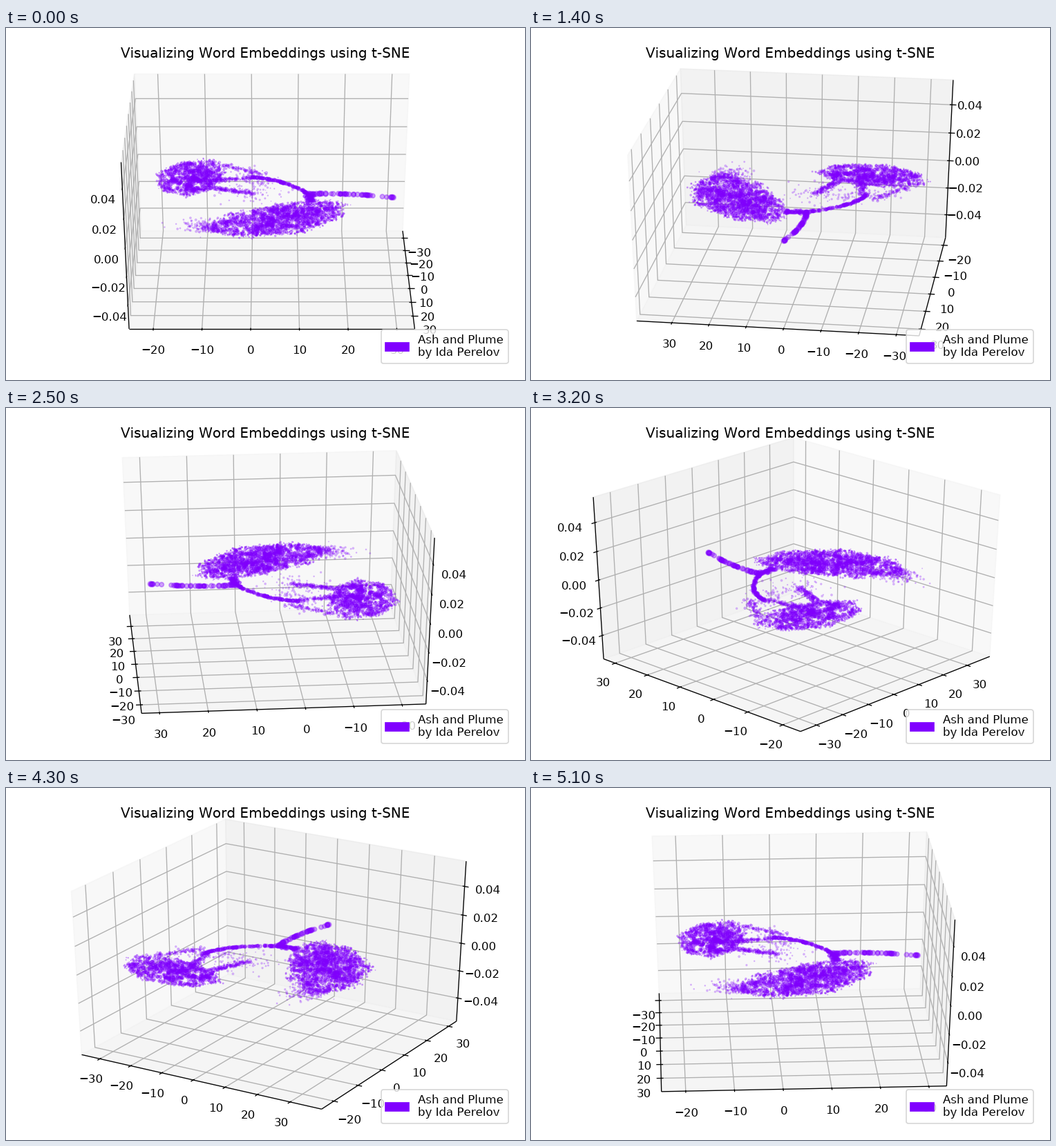
Animation of 751 by 510 pixels, one loop 5.2 s. Source, as a matplotlib script:

```python
import numpy as np
import matplotlib.pyplot as plt
from matplotlib.animation import FuncAnimation
from matplotlib.collections import LineCollection
from matplotlib.patches import Patch, Polygon

W, H, DPI = 751, 510, 120
FRAMES, INTERVAL, STEP = 52, 100, 7        # degrees of turn per frame
PURPLE = (0.5, 0.0, 1.0)
ELEV, DIST = np.radians(30), 10
EDGE = 0.5 + 1 / 48                        # half size of the drawn box
DELTA = 1 / 12
LABEL_GAP = 11.5 * 48 / 720 * DELTA

LIMITS = [(-34.5, 38.0), (-23.8, 32.5), (-0.055, 0.055)]
TICKS = [np.arange(-30, 31, 10), np.arange(-20, 31, 10),
         np.arange(-2, 3) * 0.02]
FORMATS = ["{:.0f}", "{:.0f}", "{:.2f}"]
PANE_GREYS = [0.95, 0.90, 0.925]

plt.rcParams.update({"font.family": "DejaVu Sans", "text.hinting": "default",
                     "text.kerning_factor": 6})
rng = np.random.default_rng(11)


# ---- point cloud, in box coordinates centred on zero ----
# each helper returns points, marker sizes and one alpha

def blob(centre, radii, tilt, n, alpha=0.27):
    """Soft, clumpy ellipse whose dots shrink towards a ragged rim."""
    theta = rng.uniform(0, 2 * np.pi, n)
    rho = rng.uniform(0, 1, n) ** 0.55
    half = n // 2
    seeds = rng.integers(n // 15, size=half)
    theta[:half] = theta[seeds] + rng.normal(0, 0.09, half)
    rho[:half] = np.abs(rho[seeds] + rng.normal(0, 0.06, half))
    reach = rho * (1 + 0.06 * np.sin(3 * theta) + 0.04 * np.sin(7 * theta))
    a, b = radii[0] * reach * np.cos(theta), radii[1] * reach * np.sin(theta)
    c, s = np.cos(tilt), np.sin(tilt)
    pts = np.column_stack([a * c - b * s, a * s + b * c]) + centre
    pts += rng.normal(0, 0.006, pts.shape)
    fade = 1 - 0.8 * np.clip(rho, 0, 1) ** 4
    return pts, rng.uniform(0.5, 9, n) * fade, alpha


def haze(centre, spread, n):
    """Faint loose dots."""
    return rng.normal(centre, spread, (n, 2)), rng.uniform(0.2, 3, n), 0.2


def strand(start, bend, end, n, spread, size, alpha):
    """Dots along a quadratic curve."""
    t = np.sort(rng.uniform(0, 1, n))[:, None]
    start, bend, end = map(np.array, (start, bend, end))
    line = (1 - t) ** 2 * start + 2 * t * (1 - t) * bend + t ** 2 * end
    return line + rng.normal(0, spread, line.shape), rng.uniform(*size, n), alpha


def wisp(start, end, n, spread):
    middle = (np.array(start) + end) / 2
    return strand(start, middle, end, n, spread, (0.3, 5), 0.25)


FORK = (-0.054, 0.138)
GROUPS = [
    blob((-0.25, -0.305), (0.21, 0.125), -0.2, 1150),
    blob((0.22, 0.02), (0.285, 0.15), 2.08, 1900),
    haze((0.29, -0.25), (0.035, 0.04), 130),
    haze((-0.13, -0.08), (0.09, 0.07), 130),
    wisp((-0.40, -0.19), (-0.28, -0.04), 80, 0.014),
    wisp((-0.21, -0.25), (-0.24, -0.07), 110, 0.009),
    wisp((-0.13, -0.24), (-0.06, -0.07), 130, 0.010),
    strand(FORK, (-0.02, 0.145), (0.03, 0.142), 60, 0.008, (3, 12), 0.3),
    strand((-0.25, -0.08), (-0.224, 0.05), FORK, 110, 0.003, (4, 10), 0.33),
    strand(FORK, (-0.075, 0.265), (-0.0155, 0.452), 46, 0.0015, (12, 19), 0.35),
]
flat = np.concatenate([pts for pts, _, _ in GROUPS])
sizes = np.concatenate([size for _, size, _ in GROUPS])
colors = [(*PURPLE, alpha) for pts, _, alpha in GROUPS for _ in pts]
widths = 0.6 + sizes / 30
cloud = np.column_stack([flat, np.zeros(len(flat))])


# ---- projection ----

def project(p, azim):
    """Perspective view of points with shape (..., 3)."""
    x, y, z = np.moveaxis(np.asarray(p, float), -1, 0)
    right = y * np.cos(azim) - x * np.sin(azim)
    near = x * np.cos(azim) + y * np.sin(azim)
    depth = DIST - near * np.cos(ELEV) - z * np.sin(ELEV)
    up = z * np.cos(ELEV) - near * np.sin(ELEV)
    return np.stack([right / depth, up / depth], axis=-1)


def at(p, i, value):
    q = p.copy()
    q[i] = value
    return q


def flip(p, i):
    return at(p, i, -p[i])


# ---- artists ----

fig = plt.figure(figsize=(W / DPI + 1e-6, H / DPI + 1e-6), dpi=DPI,
                 facecolor="white")
ax = fig.add_axes([15 / W, 15.8 / H, 720 / W, 480 / H])
ax.set_xlim(-0.095, 0.09)
ax.set_ylim(-0.095, 0.09)
ax.set_axis_off()
ax.set_title("Visualizing Word Embeddings using t-SNE", fontsize=12,
             y=0.92, pad=6)

panes = [ax.add_patch(Polygon(np.zeros((4, 2)), closed=False, lw=1, alpha=0.5,
                              fc=(g, g, g), ec=(g, g, g), zorder=1,
                              clip_on=False))
         for g in PANE_GREYS]


def line_set(color, zorder):
    return ax.add_collection(LineCollection(
        [], colors=color, linewidths=0.8, zorder=zorder, clip_on=False),
        autolim=False)


def tick_text(value, form):
    return form.format(value).replace("-", "\u2212")


grid = line_set("#b0b0b0", 2)
spines = line_set("black", 3)
marks = line_set("black", 3)
labels = [[ax.text(0, 0, tick_text(v, form), fontsize=10, ha="center",
                   va="top", zorder=4) for v in values]
          for values, form in zip(TICKS, FORMATS)]
dots = ax.scatter(flat[:, 0], flat[:, 1], s=sizes, c=colors,
                  edgecolors="face", linewidths=widths, zorder=5,
                  clip_on=False)

legend = ax.legend(handles=[Patch(color=PURPLE,
                                  label="Ash and Plume\nby Ida Perelov")],
                   loc="lower right", fontsize=10)
legend.set_zorder(6)
legend.get_texts()[0].set_linespacing(1.1)


def draw(frame):
    azim = np.radians(frame * STEP)
    camera = np.array([np.cos(azim), np.sin(azim), 1])
    far = np.where(camera < 0, EDGE, -EDGE)
    grid_segs, spine_segs, mark_segs = [], [], []

    for i in range(3):
        j, k = (i + 1) % 3, (i + 2) % 3
        corners = [far, flip(far, j), flip(flip(far, j), k), flip(far, k)]
        panes[i].set_xy(project(corners, azim))

        side = 1 if i == 0 else 0
        edge = flip(far, side)
        spine_segs.append(project([edge, flip(edge, i)], azim))

        out = np.sign(edge)
        lo, hi = LIMITS[i]
        for value, label in zip(TICKS[i], labels[i]):
            u = (value - lo) / (hi - lo) - 0.5
            base = at(far, i, u)
            grid_segs.append(project([flip(base, j), base, flip(base, k)], azim))
            tick = at(edge, i, u)
            step = at(np.zeros(3), side, out[side] * DELTA)
            mark_segs.append(project([tick - 0.1 * step, tick + 0.2 * step],
                                     azim))
            label.set_position(project(tick + at(out, i, 0) * LABEL_GAP, azim))

    grid.set_segments(grid_segs)
    spines.set_segments(spine_segs)
    marks.set_segments(mark_segs)
    dots.set_offsets(project(cloud, azim))
    return []


anim = FuncAnimation(fig, draw, frames=FRAMES, interval=INTERVAL,
                     init_func=lambda: draw(0), repeat=True, repeat_delay=0,
                     blit=False)
plt.show()
```
